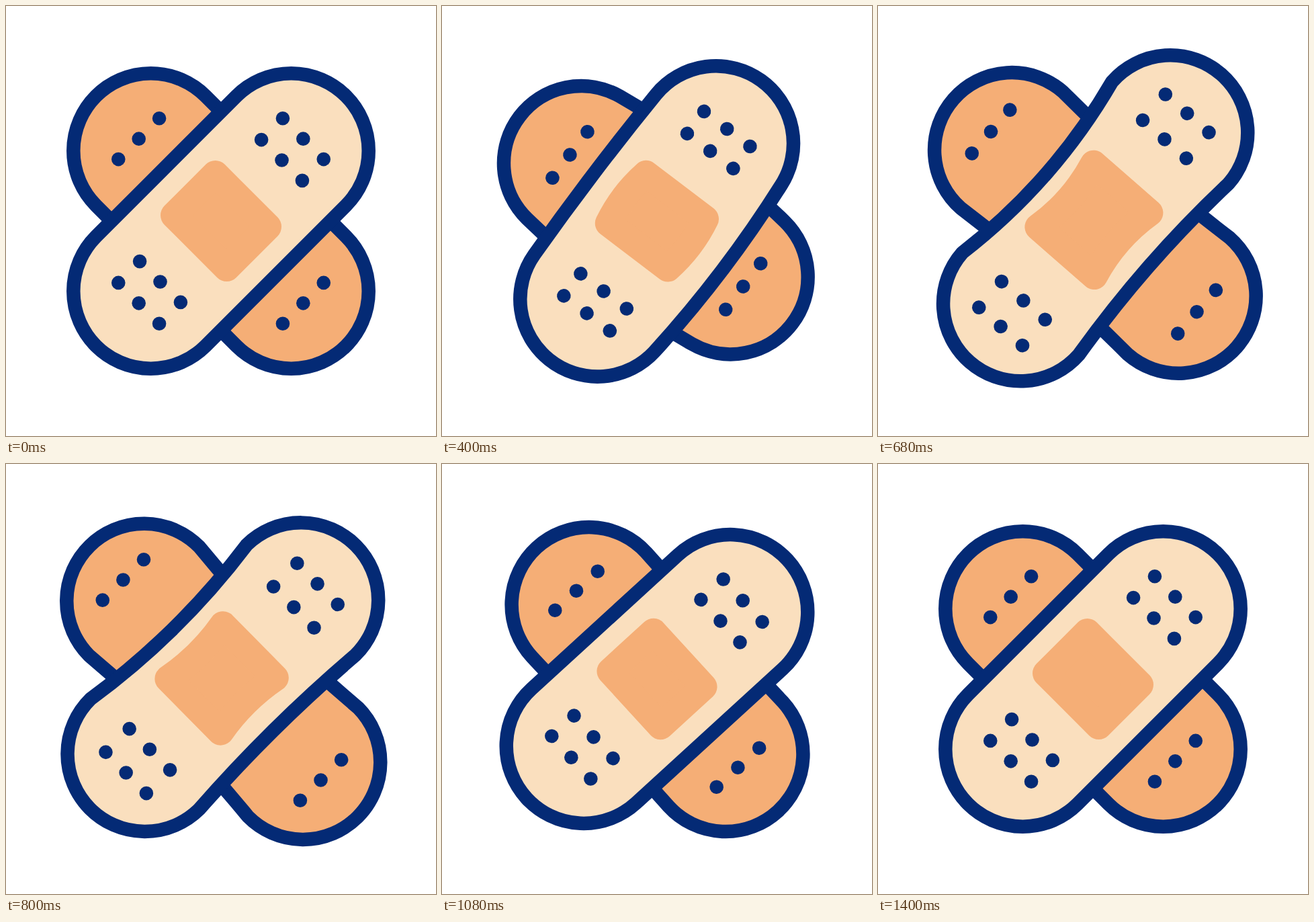
Animation, 640 px wide and 640 px high, one loop 1480 ms. Source, as an HTML page:

```html
<!DOCTYPE html>
<html lang="en">
<head>
<meta charset="utf-8">
<title>Bandages</title>
<style>
  html, body { margin: 0; width: 100%; height: 100%; overflow: hidden; background: #fff; }
  svg { display: block; width: 100vw; height: 100vh; }
  .strip { stroke: #042a75; stroke-width: 20.5; stroke-linejoin: round; }
  .pad { fill: #f5ae76; stroke: #f5ae76; stroke-width: 40; stroke-linejoin: round; }
  circle { fill: #042a75; }
</style>
</head>
<body>
<svg viewBox="0 0 640 640">
  <g id="all">
    <g id="back" transform="translate(320 320) rotate(45)"><path class="strip" fill="#f5ae76"/></g>
    <g id="front" transform="translate(320 320) rotate(-45)"><path class="strip" fill="#fadfbe"/><path class="pad"/></g>
  </g>
</svg>
<script>
const LOOP = 1480, STEP = 40, R = 115.2;

// Offsets from the resting shape: cap centre, outer and inner dot rows,
// pad length, pad bulge, strong and soft bulge of the strip's sides.
const REST = [0, 0, 0, 0, 0, 0, 0];
const SQUASH = [-10, -13.5, -6.6, -2.9, 8.5, 9, 12];
const STRETCH = [20.7, 36.5, 30.5, 18.5, -7, -16, -8];
const PEAK = STRETCH.map(x => x * 1.04);

const frontKeys = [[0, REST], [270, SQUASH], [660, PEAK], [1050, REST]];
const backKeys = [[200, REST], [477, SQUASH], [738, STRETCH], [785, STRETCH], [1176, REST]];
const turnKeys = [[0, [0]], [470, [-8.2]], [960, [3.1]], [1400, [0]]];

const ease = x => (1 - Math.cos(Math.PI * x)) / 2;

function pose(keys, t) {
  if (t <= keys[0][0]) return keys[0][1];
  for (let i = 1; i < keys.length; i++) {
    const [t0, a] = keys[i - 1], [t1, b] = keys[i];
    if (t < t1) {
      const k = ease((t - t0) / (t1 - t0));
      return a.map((v, j) => v + (b[j] - v) * k);
    }
  }
  return keys[keys.length - 1][1];
}

function makeBandage(id, rows) {
  const g = document.getElementById(id), dots = [];
  for (const row of rows)
    for (const side of [-1, 1])
      for (const lane of [-1, 0, 1]) {
        const el = document.createElementNS("http://www.w3.org/2000/svg", "circle");
        el.setAttribute("r", 10.3);
        el.setAttribute("cy", lane * 43);
        g.appendChild(el);
        dots.push({ el, row, side });
      }
  return { strip: g.querySelector(".strip"), pad: g.querySelector(".pad"), dots };
}

// One long side: where it leaves the caps, and its control height.
function edge(c, mid, bulge) {
  const tilt = bulge > 0 ? Math.atan(2 * bulge / (c + 1.5 * bulge)) : 0;
  const half = c + R * Math.sin(tilt), w = R * Math.cos(tilt);
  return { l: mid - half, r: mid + half, w, q: w + 2 * bulge };
}

function stripPath(dc, topBulge, lowBulge) {
  const c = 147.8 + dc, mid = dc * 0.26;
  const a = edge(c, mid, topBulge), b = edge(c, mid, lowBulge);
  return `M${a.l} ${-a.w}Q${mid} ${-a.q} ${a.r} ${-a.w}A${R} ${R} 0 0 1 ${b.r} ${b.w}` +
         `Q${mid} ${b.q} ${b.l} ${b.w}A${R} ${R} 0 0 1 ${a.l} ${-a.w}Z`;
}

function padPath(dx, bulge, mid) {
  const l = mid - 43.5 - dx, r = mid + 43.5 + dx, h = 55.5, q = h + 2 * bulge;
  return `M${l} ${-h}Q${mid} ${-q} ${r} ${-h}V${h}Q${mid} ${q} ${l} ${h}Z`;
}

function drawBandage(b, [dc, outer, inner, dx, padBulge, strong, soft]) {
  const shift = dc * 0.1;
  b.strip.setAttribute("d", stripPath(dc, b.pad ? strong : soft, soft));
  if (b.pad) b.pad.setAttribute("d", padPath(dx, padBulge, shift));
  for (const { el, row, side } of b.dots) {
    const u = row === "outer" ? 173 + outer : 128 + inner;
    el.setAttribute("cx", shift + side * u);
  }
}

const back = makeBandage("back", ["outer"]);
const front = makeBandage("front", ["outer", "inner"]);
const all = document.getElementById("all");

function draw(ms) {
  const t = Math.floor((ms % LOOP) / STEP) * STEP;
  all.setAttribute("transform", `rotate(${pose(turnKeys, t)[0]} 320 320)`);
  drawBandage(back, pose(backKeys, t));
  drawBandage(front, pose(frontKeys, t));
}

const start = performance.now();
function tick() {
  draw(performance.now() - start);
  requestAnimationFrame(tick);
}
tick();
</script>
</body>
</html>
```
